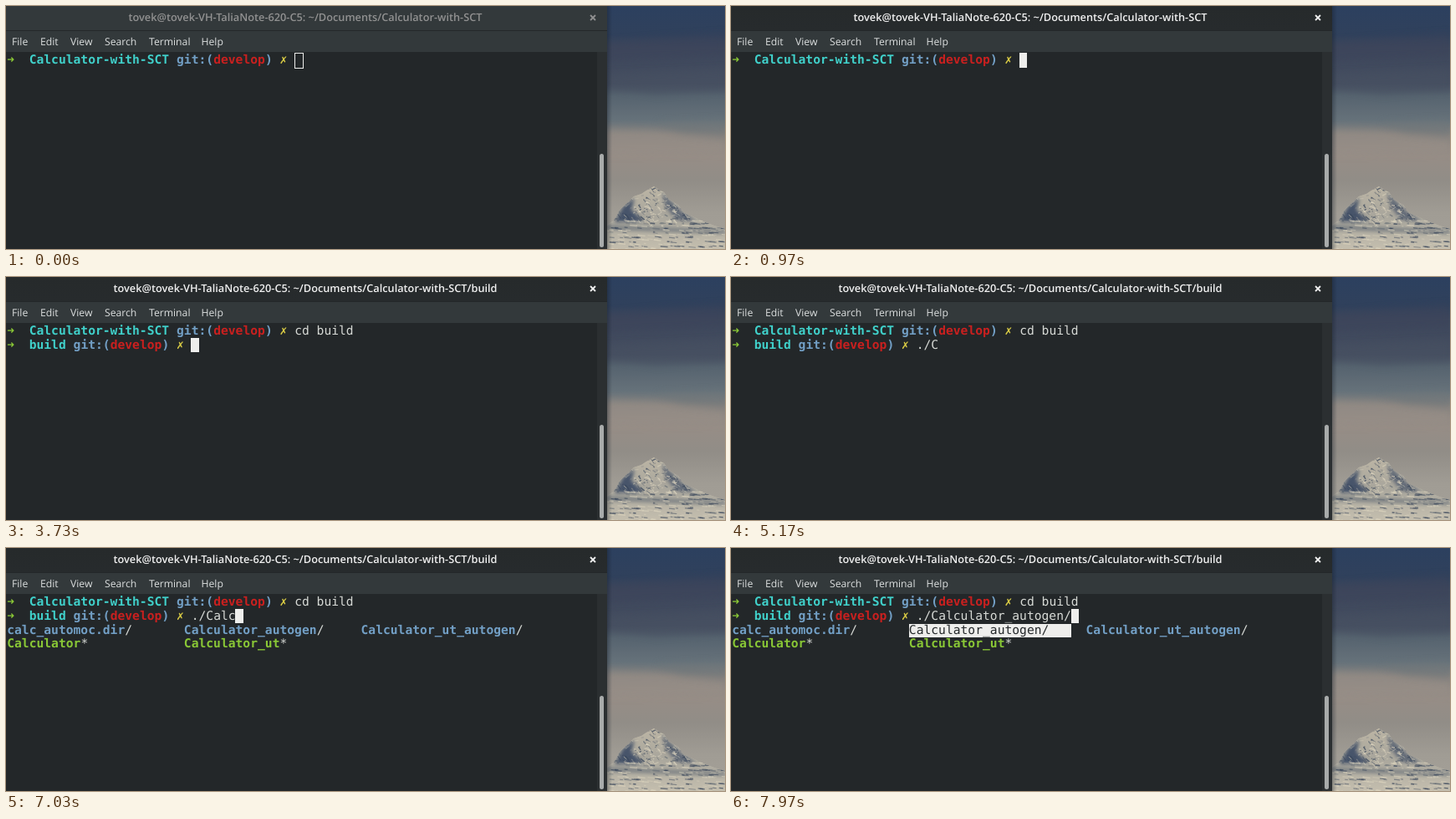
Recreate the animation shown at these times as an HTML page with a canvas. Size 860 by 291 pixels, loop 8000 ms.

```html
<!DOCTYPE html>
<html lang="en">
<head>
<meta charset="utf-8">
<title>Terminal session</title>
<style>
  html, body { margin: 0; width: 100%; height: 100%; overflow: hidden; background: #232729; }
  #stage { position: relative; width: 860px; height: 291px; overflow: hidden; text-rendering: geometricPrecision; }
  #stage * { position: absolute; white-space: pre; }
  #sky { left: 718px; top: 0; }
  #window { left: 0; top: 0; width: 718.6px; height: 291px; background: #232729; overflow: hidden; }
  #bar, #idle { left: 0; top: 0; width: 719px; height: 30px; box-sizing: border-box; border-bottom: 1px solid #24282a; }
  #bar { background: linear-gradient(#262a2b, #272b2d); }
  #idle { background: #33393b; }
  #title { left: 0; top: 0; width: 716px; text-align: center; font: 600 12.75px/27px "Open Sans", "Noto Sans", sans-serif; }
  #close { left: 698px; top: 10px; fill: none; stroke: currentColor; stroke-width: 1.8; }
  #menu { left: 0; top: 30px; width: 719px; height: 25.4px; background: #33393b; color: #dcdfdf; font: 12.2px/26px "Open Sans", "Noto Sans", sans-serif; }
  #trough { left: 707px; top: 55.4px; width: 12px; height: 236px; background: #2b2f31; }
  #slider { left: 709.8px; top: 176.5px; width: 5.6px; height: 112.5px; border-radius: 3px; background: #a8abab; }
  #term { left: 1.2px; top: 57px; color: #d6d9d5; font: 14.65px/16.75px "DejaVu Sans Mono", monospace; }
  #term .cyan, #term .blue, #term .red, #term .yellow, #term .green { font-weight: bold; }
  .cyan { color: #40d0ca; }
  .blue { color: #729fc5; }
  .red { color: #c9201f; }
  .yellow { color: #ddcf45; }
  .green { color: #89c736; }
  #term .picked { width: 194px; height: 16.3px; background: #eeeeec; color: #25292b; font-weight: normal; }
  #cursor { width: 9.2px; height: 17.4px; margin-top: -.8px; background: #eeeeec; }
  #cursor.hollow { width: 11px; height: 19px; margin-top: -1.4px; box-sizing: border-box; border: 1px solid #eeeeec; background: none; }
</style>
</head>
<body>
<div id="stage">
  <canvas id="sky" width="142" height="291"></canvas>
  <div id="window">
    <div id="bar"></div>
    <div id="idle"></div>
    <div id="title"></div>
    <svg id="close" width="8" height="8"><path d="M1 1 7 7M7 1 1 7"/></svg>
    <div id="menu"></div>
    <div id="trough"></div>
    <div id="slider"></div>
    <div id="term"></div>
  </div>
</div>
<script>
const LOOP = 8000, COL = 8.82, ROW = 16.75, BLINK = 600;
const FOCUS = 470, FADE = 200, ENTER = 3380, LIST = 6900, PICK_1 = 7400, PICK_2 = 7850;
const $ = id => document.getElementById(id);
const term = $('term');

function add(parent, text, left, top, cls = '') {
  const el = document.createElement('span');
  el.textContent = text;
  el.className = cls;
  el.style.left = left + 'px';
  el.style.top = top + 'px';
  parent.append(el);
  return el;
}
const put = (parent, text, col, row, cls) => add(parent, text, col * COL, row * ROW, cls);

function group() {
  const el = document.createElement('div');
  term.append(el);
  return el;
}

function prompt(dir, row) {
  const box = group();
  let col = 3 + dir.length + 1;
  put(box, '➜', 0, row, 'green');
  put(box, dir, 3, row, 'cyan');
  put(box, 'git:(', col, row, 'blue');
  put(box, 'develop', col + 5, row, 'red');
  put(box, ')', col + 12, row, 'blue');
  put(box, '✗', col + 14, row, 'yellow');
  col += 16;
  return { box, row, col, line: put(box, '', col, row) };
}

const menu = { File: 7, Edit: 41, View: 77, Search: 118, Terminal: 171, Help: 233.5 };
for (const name in menu) add($('menu'), name, menu[name], 0);

const first = prompt('Calculator-with-SCT', 0);
const second = prompt('build', 1);

const listing = group();
const addEntry = (name, mark, col, row, cls) => {
  put(listing, name, col, row, cls);
  put(listing, mark, col + name.length, row);
};
addEntry('calc_automoc.dir', '/', 0, 2, 'blue');
addEntry('Calculator_autogen', '/', 24, 2, 'blue');
addEntry('Calculator_ut_autogen', '/', 48, 2, 'blue');
addEntry('Calculator', '*', 0, 3, 'green');
addEntry('Calculator_ut', '*', 24, 3, 'green');
const pick1 = put(listing, 'calc_automoc.dir/', 0, 2, 'picked');
const pick2 = put(listing, 'Calculator_autogen/', 24, 2, 'picked');

const cursor = put(term, '', 0, 0);
cursor.id = 'cursor';

// Each key: time, then the command line as it stands.
const typing = (text, times) => times.map((at, i) => [at, text.slice(0, i + 1)]);
const firstKeys = [[FOCUS, ''], ...typing('cd build', [2170, 2300, 2430, 2590, 2740, 2860, 2960, 3080])];
const secondKeys = [
  [ENTER, ''],
  ...typing('./Calc', [3950, 4200, 4450, 5700, 5870, 6050]),
  [LIST, './Calc'],
  [PICK_1, './calc_automoc.dir/'],
  [PICK_2, './Calculator_autogen/'],
];
const latest = (keys, t) => keys.filter(key => key[0] <= t).pop() || [0, ''];
const display = (el, on) => { el.style.display = on ? 'block' : 'none'; };

const path = 'tovek@tovek-VH-TaliaNote-620-C5: ~/Documents/Calculator-with-SCT';

function draw(t) {
  const entered = t >= ENTER;
  const focus = Math.min(1, Math.max(0, (t - FOCUS) / FADE));
  const grey = Math.round(145 + 95 * focus);
  $('idle').style.opacity = 1 - focus;
  $('title').textContent = path + (entered ? '/build' : '');
  $('title').style.color = $('close').style.color = `rgb(${grey},${grey},${grey})`;

  first.line.textContent = latest(firstKeys, t)[1];
  second.line.textContent = latest(secondKeys, t)[1];
  display(second.box, entered);
  display(listing, t >= LIST);
  display(pick1, t >= PICK_1 && t < PICK_2);
  display(pick2, t >= PICK_2);

  const active = entered ? second : first;
  const [at, text] = latest(entered ? secondKeys : firstKeys, t);
  cursor.style.left = (active.col + text.length) * COL - .2 + 'px';
  cursor.style.top = active.row * ROW + 'px';
  cursor.className = t < FOCUS ? 'hollow' : '';
  display(cursor, t < FOCUS || Math.floor((t - at) / BLINK) % 2 === 0);
}

function paintSky() {
  const g = $('sky').getContext('2d');
  let seed = 17;
  const rnd = () => (seed = seed * 16807 % 2147483647) / 2147483647;
  const fade = (x, y, stops) => {
    const fill = g.createLinearGradient(0, 0, x, y);
    stops.forEach(([at, color]) => fill.addColorStop(at, color));
    g.fillStyle = fill;
    g.fillRect(0, 0, 142, 291);
  };
  const shape = (points, color) => {
    g.fillStyle = color;
    g.beginPath();
    points.forEach(([x, y]) => g.lineTo(x, y));
    g.fill();
  };
  fade(0, 291, [[0, '#2c405f'], [.12, '#30415c'], [.17, '#3d475c'], [.32, '#454e60'],
    [.37, '#56636f'], [.47, '#66727a'], [.53, '#87837f'], [.62, '#968d86'],
    [.72, '#918d87'], [.85, '#a09c94'], [1, '#a5a199']]);

  g.filter = 'blur(4px)';
  shape([[0, 44], [70, 38], [142, 33], [142, 60], [0, 66]], '#3c455a88');
  shape([[0, 82], [142, 76], [142, 100], [60, 106], [0, 96]], '#48516388');
  shape([[0, 148], [60, 150], [142, 160], [142, 176], [0, 178]], '#9b918988');
  shape([[60, 140], [142, 136], [142, 156], [90, 152]], '#6f777b88');
  g.filter = 'none';

  const ridge = [[0, 263], [9, 257], [16, 244], [25, 236], [33, 228], [42, 225], [48, 221],
    [57, 216], [64, 221], [69, 223], [75, 232], [86, 238], [92, 247], [103, 252],
    [116, 258], [129, 263], [142, 267], [142, 291], [0, 291]];
  g.save();
  shape(ridge, '#b9b3a4');
  g.clip();
  fade(0, 291, [[.74, '#bdb6a5'], [.86, '#a9a69c'], [1, '#c4beae']]);
  g.filter = 'blur(2px)';
  shape([[10, 259], [20, 240], [34, 230], [30, 244], [45, 258]], '#47546a');
  shape([[66, 222], [90, 246], [108, 258], [84, 256], [72, 242]], '#505c6ecc');
  shape([[0, 262], [142, 268], [142, 273], [0, 268]], '#5a647199');
  g.filter = 'none';
  const streak = (color, x, y, length, slope) => {
    g.strokeStyle = color;
    g.globalAlpha = .25 + rnd() * .5;
    g.lineWidth = .6 + rnd();
    g.beginPath();
    g.moveTo(x, y);
    g.lineTo(x + length, y + length * slope);
    g.stroke();
  };
  const rock = '#39465a', snow = '#ddd5bf';
  for (let i = 0; i < 260; i++) {
    streak(i % 2 ? rock : snow, 12 + rnd() * 88, 217 + rnd() * 40, 1 + rnd() * 4, rnd() * 2.4 - .8);
  }
  for (let i = 0; i < 240; i++) {
    const y = 254 + Math.floor(rnd() * 7) * 5.5 + rnd() * 1.5;
    streak(i % 2 ? rock : snow, rnd() * 142, i % 2 ? y : y + 2.7, 2 + rnd() * 7, .1);
  }
  g.restore();
  fade(7, 0, [[0, '#10182466'], [1, '#10182400']]);
}

paintSky();
const start = performance.now();
function tick() {
  draw((performance.now() - start) % LOOP);
  requestAnimationFrame(tick);
}
tick();
</script>
</body>
</html>
```
